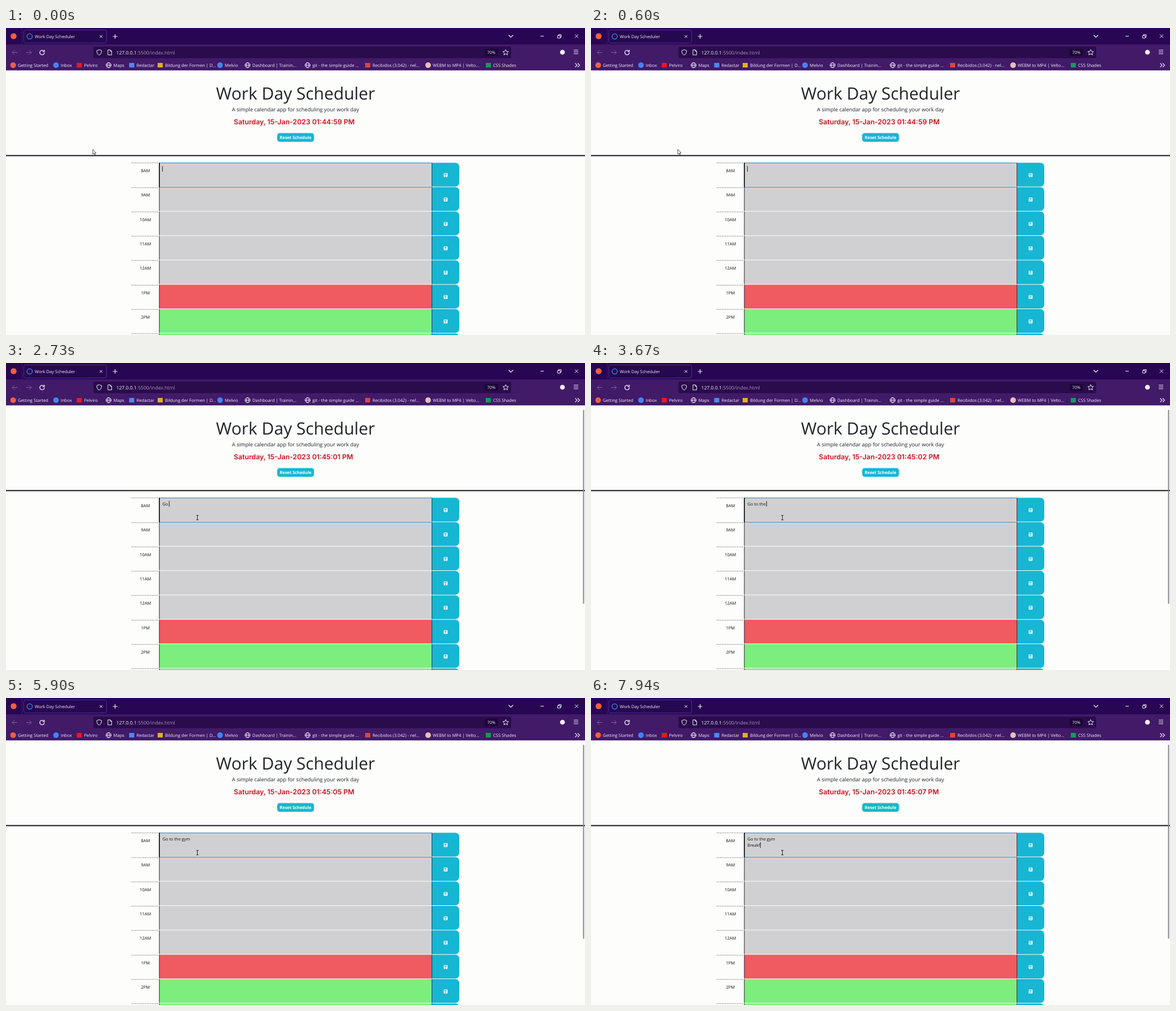
Recreate the animation shown at these times as an HTML page with a canvas. Size 1027 px wide and 545 px high, loop 8000 ms.

```html
<!DOCTYPE html>
<html lang="en">
<head>
<meta charset="utf-8">
<title>Work Day Scheduler</title>
<style>
  html, body { margin: 0; width: 100%; height: 100%; overflow: hidden; background: #fdfdfc; }
  canvas, svg { position: absolute; left: 0; top: 0; width: 1027px; height: 545px; }
  text { font-family: "Open Sans", "Noto Sans", sans-serif; white-space: pre; text-rendering: geometricPrecision; }
</style>
</head>
<body>
<canvas id="base" width="1027" height="545"></canvas>
<svg id="words" viewBox="0 0 1027 545"></svg>
<canvas id="live" width="1027" height="545"></canvas>
<script>
const LOOP = 8000;
const base = document.getElementById('base').getContext('2d');
const live = document.getElementById('live').getContext('2d');
const words = document.getElementById('words');
const PALE = '#f4effa', DIM = '#7f62a0';
const ROW_TOP = 239.2, ROW_STEP = 43.3;

function label(str, x, y, size, fill, extra = {}) {
  const el = document.createElementNS('http://www.w3.org/2000/svg', 'text');
  const attrs = { x, y, 'font-size': size, fill, ...extra };
  for (const k in attrs) el.setAttribute(k, attrs[k]);
  el.textContent = str;
  words.append(el);
  return el;
}

function rect(c, x, y, w, h, fill) {
  c.fillStyle = fill;
  c.fillRect(x, y, w, h);
}

function box(c, x, y, w, h, r, fill, line) {
  c.beginPath();
  c.roundRect(x, y, w, h, r);
  if (fill) { c.fillStyle = fill; c.fill(); }
  if (line) { c.strokeStyle = line; c.lineWidth = 1; c.stroke(); }
}

function dot(x, y, r, fill) {
  base.fillStyle = fill;
  base.beginPath();
  base.arc(x, y, r, 0, 7);
  base.fill();
}

function stroke(d, x, y, color = PALE, width = 1) {
  base.save();
  base.translate(x, y);
  base.strokeStyle = color;
  base.lineWidth = width;
  base.stroke(new Path2D(d));
  base.restore();
}

const ring = r => `M${r} 0A${r} ${r} 0 1 1 ${-r} 0A${r} ${r} 0 1 1 ${r} 0`;

function globe(x, y) {
  stroke(ring(4.5) + 'M-4.5 0H4.5M0 -4.5C-3 -2 -3 2 0 4.5C3 2 3 -2 0 -4.5', x, y);
}

function drawBrowser() {
  rect(base, 0, 0, 1027, 30, '#280653');
  rect(base, 0, 29, 1027, 46.5, '#411a68');
  rect(base, 28, 0, 1, 29, '#3d1b66');
  dot(13.5, 14.5, 5.3, '#f0603c');
  box(base, 31.5, 3.5, 147, 23, 3, '#260850', '#4a2c9c');
  stroke(ring(4.7), 42, 15, '#4a86e8', 1.3);
  label('Work Day Scheduler', 51, 18, 7.6, PALE);
  stroke('M-2.3 -2.3L2.3 2.3M2.3 -2.3L-2.3 2.3', 168.5, 15);
  stroke('M-4 0H4M0 -4V4', 193.5, 15, PALE, 1.2);
  stroke('M-4 -2L0 2L4 -2', 895.5, 14.5, PALE, 1.2);
  stroke('M-3 .5H3', 951, 14);
  stroke('M-3 -1H1.5V3.5H-3ZM-1.5 -1V-2.8H3.2V2H1.5', 981.5, 14.5);
  stroke('M-3 -3L3 3M3 -3L-3 3', 1012, 14.5);

  stroke('M4.5 0H-4.5M-.5 -4L-4.5 0L-.5 4', 15.5, 43.5, DIM);
  stroke('M-4.5 0H4.5M.5 -4L4.5 0L.5 4', 40.5, 43.5, DIM);
  stroke('M4 0A4 4 0 1 1 2.6 -3M4 -4.8V-1.7H.8', 64, 43.5, PALE, 1.3);
  box(base, 155, 33, 741, 20.5, 3, '#2a0b4c');
  stroke('M0 -4.8L4.2 -3.2C4.2 1 3 3.5 0 4.8C-3 3.5 -4.2 1 -4.2 -3.2Z', 165.3, 43.3);
  stroke('M-3.2 -4.5H1L3.4 -2V4.5H-3.2ZM1 -4.5V-2H3.4', 184, 43.3);
  const url = label('127.0.0.1', 195.5, 46.5, 8.6, PALE);
  const rest = document.createElementNS('http://www.w3.org/2000/svg', 'tspan');
  rest.setAttribute('fill', '#a893bd');
  rest.textContent = ':5500/index.html';
  url.append(rest);
  box(base, 849, 37, 23.5, 12.5, 2.5, '#1c0636');
  label('70%', 853.5, 46, 7.4, PALE);
  stroke('M0 -5L1.5 -1.7L5 -1.4L2.4 1L3.2 4.5L0 2.6L-3.2 4.5L-2.4 1L-5 -1.4L-1.5 -1.7Z', 886.3, 43.3);
  dot(987, 43, 4.3, PALE);
  stroke('M-4 -3.3H4M-4 0H4M-4 3.3H4', 1011, 42.5, PALE, 1.1);

  const marks = [
    ['Getting Started', 21, 'o', '#f0603c'],
    ['Inbox', 97, 'o', '#4285f4'],
    ['Pelviro', 138.5, 's', '#f01818'],
    ['Maps', 190.5, 'g'],
    ['Redactar', 231.5, 's', '#4a8af0'],
    ['Bildung der Formen | D...', 282, 's', '#e0b020'],
    ['Melvio', 388, 'o', '#4285f4'],
    ['Dashboard | Trainin...', 437, 'g'],
    ['git - the simple guide ...', 543.5, 'g'],
    ['Recibidos (3.042) - nel...', 650, 's', '#e04438'],
    ['WEBM to MP4 | Velto...', 757, 'o', '#e8c0b8'],
    ['CSS Shades', 864, 's', '#0f9d58'],
  ];
  for (const [str, x, kind, color] of marks) {
    label(str, x, 69, 7.65, PALE);
    if (kind === 'g') globe(x - 8.5, 66);
    else if (kind === 'o') dot(x - 8.3, 66, 5, color);
    else rect(base, x - 13, 62, 9, 8, color);
  }
  stroke('M-4 -3.5L-.5 0L-4 3.5M.5 -3.5L4 0L.5 3.5', 1013.5, 66, PALE, 1.1);
}

function saveIcon(x, y) {
  box(base, x - 3.4, y - 3.4, 6.8, 6.8, 1, '#f4fcfd');
  rect(base, x - 2.2, y - 2.3, 3.8, 1.7, '#17b6d3');
  dot(x, y + 1.3, 1, '#17b6d3');
}

function drawPage() {
  rect(base, 0, 75.5, 1027, 469.5, '#fdfdfc');
  const mid = { 'text-anchor': 'middle' };
  label('Work Day Scheduler', 513.5, 127, 30, '#212529', mid);
  label('A simple calendar app for scheduling your work day', 513.5, 148, 9.35, '#212529', mid);
  box(base, 481, 186.5, 65.3, 15.5, 4.5, '#17b8d0');
  label('Reset Schedule', 513.6, 197, 7.45, '#fff', { ...mid, 'font-weight': 700 });
  rect(base, 0, 225.5, 1027, 2, '#17131c');

  ['8AM', '9AM', '10AM', '11AM', '12AM', '1PM', '2PM', '3PM'].forEach((hour, i) => {
    const y = ROW_TOP + i * ROW_STEP, h = ROW_STEP - 1;
    const fill = i < 5 ? '#d0d0d2' : i === 5 ? '#f05a61' : '#7cee7e';
    for (let x = 223; x < 271; x += 3) rect(base, x, Math.round(y), 1.3, 1, '#555');
    label(hour, 247.3, y + 16.8, 7.5, '#111', mid);
    rect(base, 272, y, 483, h, fill);
    rect(base, 271.5, y, 1, h, '#222');
    rect(base, 755, y, 1, h, '#333');
    box(base, 756, y, 48, h, [0, 7, 7, 0], '#17b6d3');
    saveIcon(779.8, y + 22);
  });
  rect(base, 272, 239, 484, 1, '#3f7fb4');
  rect(base, 272, 282, 484, 1, '#3f7fb4');
  rect(base, 271.3, 239, 1.5, 44, '#111');
}

drawBrowser();
drawPage();

const clock = label('', 404, 171.3, 12.3, '#d0101c',
  { 'font-weight': 600, style: 'font-family: Inter, "DejaVu Sans", sans-serif' });
const lines = [label('', 277.6, 252.7, 7.45, '#16161a'), label('', 277.6, 263.8, 7.45, '#16161a')];

const NOTE = 'Go to the gym\nBreakf';
const KEYS = [2530, 2640, 2720, 2800, 2890, 2980, 3070, 3160, 3250, 3420, 3720, 3860, 4000,
  5930, 6440, 6770, 6970, 7170, 7340, 7770];
// Spans in which the caret is hidden
const HIDDEN = [[610, 1140], [1670, 2200], [4350, 4770], [5440, 5930]];

function drawArrow(x, y) {
  live.save();
  live.translate(x, y);
  const p = new Path2D('M0 0V8.6L2 6.8L3.3 9.8L4.6 9.2L3.3 6.3H5.8Z');
  live.fillStyle = '#fff';
  live.fill(p);
  live.strokeStyle = '#222';
  live.lineWidth = 0.8;
  live.stroke(p);
  live.restore();
}

function drawBeam(x, y) {
  live.strokeStyle = '#222';
  live.lineWidth = 1;
  live.stroke(new Path2D(`M${x - 2} ${y - 4}H${x + 2}M${x} ${y - 4}V${y + 4}M${x - 2} ${y + 4}H${x + 2}`));
}

function draw(t) {
  live.clearRect(0, 0, 1027, 545);

  const sec = 44 * 60 + 59 + Math.max(0, Math.floor((t + 100) / 1000));
  const two = n => String(n).padStart(2, '0');
  clock.textContent = `Saturday, 15-Jan-2023 01:${two(Math.floor(sec / 60))}:${two(sec % 60)} PM`;

  const typed = NOTE.slice(0, KEYS.filter(k => k <= t).length).split('\n');
  lines.forEach((el, i) => { el.textContent = typed[i] || ''; });

  if (!HIDDEN.some(([a, b]) => t >= a && t < b)) {
    const n = typed.length - 1;
    live.font = '7.45px "Open Sans", "Noto Sans", sans-serif';
    const x = Math.round(277.3 + live.measureText(typed[n]).width);
    rect(live, x, 245 + n * 11, 1, 10, '#222');
  }

  const k = Math.min(1, Math.max(0, (t - 750) / 450));
  const ease = k * k * (3 - 2 * k);
  const x = 154 + 185.5 * ease, y = 215.5 + 59 * ease;
  if (x > 272 && y > 239) drawBeam(x, y);
  else drawArrow(x, y);

  if (t >= 780) box(live, 1023.5, 83, 2, 344.5, 1, '#85858a');
}

function tick(now) {
  draw(now % LOOP);
  requestAnimationFrame(tick);
}
draw(0);
requestAnimationFrame(tick);
</script>
</body>
</html>
```
